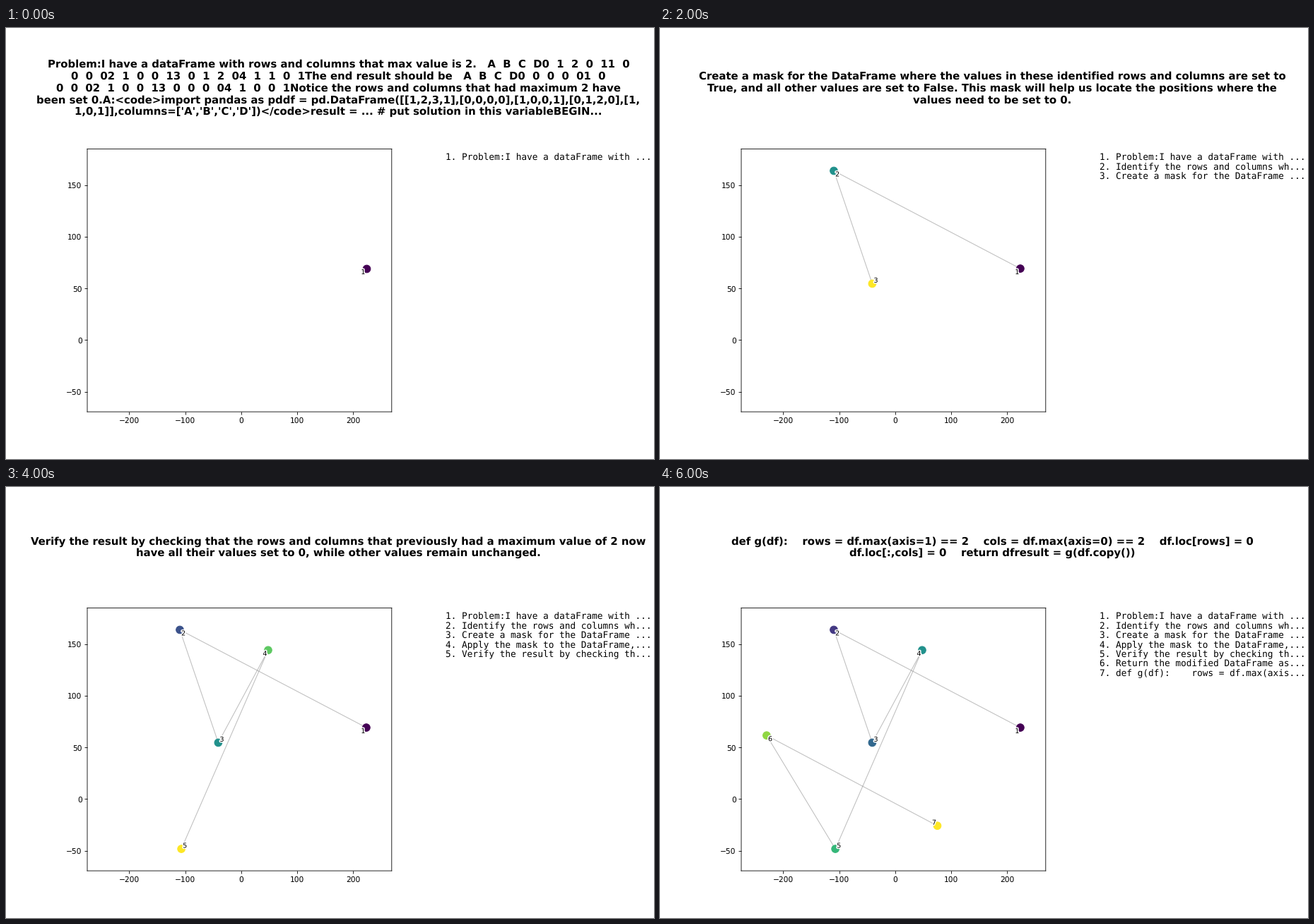
A matplotlib script for the animation above (7 s loop, 917 by 611 pixels).

```python
import matplotlib.pyplot as plt
import numpy as np
from matplotlib.animation import FuncAnimation
from matplotlib.patheffects import withStroke

W, H, DPI = 917, 611, 76.4
PX = 72 / DPI  # points per pixel
LEFT, RIGHT, TOP, BOTTOM = 115, 545.8, 171.4, 544.1  # plot box in pixels

# soft edges: neither text nor lines are forced onto the pixel grid
plt.rcParams.update({"font.family": "DejaVu Sans", "text.hinting": "none",
                     "path.snap": False})

STEPS = [
    ["Problem:I have a dataFrame with rows and columns that max value is 2."
     "   A  B  C  D0  1  2  0  11  0",
     "0  0  02  1  0  0  13  0  1  2  04  1  1  0  1The end result should be"
     "   A  B  C  D0  0  0  0  01  0",
     "0  0  02  1  0  0  13  0  0  0  04  1  0  0  1Notice the rows and columns"
     " that had maximum 2 have",
     "been set 0.A:<code>import pandas as pddf = "
     "pd.DataFrame([[1,2,3,1],[0,0,0,0],[1,0,0,1],[0,1,2,0],[1,",
     "1,0,1]],columns=['A','B','C','D'])</code>result = ... "
     "# put solution in this variableBEGIN..."],
    ["Identify the rows and columns where the maximum value is 2. "
     "This involves checking each row and",
     "column to see if the maximum value in that row or column is 2."],
    ["Create a mask for the DataFrame where the values in these identified "
     "rows and columns are set to",
     "True, and all other values are set to False. "
     "This mask will help us locate the positions where the",
     "values need to be set to 0."],
    ["Apply the mask to the DataFrame, setting all values in the identified "
     "rows and columns to 0. This",
     "will ensure that any cell in a row or column that had a maximum value "
     "of 2 is now 0."],
    ["Verify the result by checking that the rows and columns that previously "
     "had a maximum value of 2 now",
     "have all their values set to 0, while other values remain unchanged."],
    ["Return the modified DataFrame as the result."],
    ["def g(df):    rows = df.max(axis=1) == 2    cols = df.max(axis=0) == 2"
     "    df.loc[rows] = 0",
     "df.loc[:,cols] = 0    return dfresult = g(df.copy())"],
]

POINTS = np.array([(223.6, 69.3), (-109.7, 164), (-41, 54.7), (48.1, 144.3),
                   (-107, -48.2), (-229.8, 61.7), (75.3, -25.8)])
# side of the point on which each label sits (right, up)
SIDES = [(-1, -1), (1, -1), (1, 1), (-1, -1), (1, 1), (1, -1), (-1, 1)]

fig = plt.figure(figsize=((W + 0.001) / DPI, (H + 0.001) / DPI), dpi=DPI,
                 facecolor="white")
ax = fig.add_axes([LEFT / W, 1 - BOTTOM / H,
                   (RIGHT - LEFT) / W, (BOTTOM - TOP) / H])
low, high = POINTS.min(axis=0), POINTS.max(axis=0)
pad = 0.1 * (high - low)
ax.set_xlim(low[0] - pad[0], high[0] + pad[0])
ax.set_ylim(low[1] - pad[1], high[1] + pad[1])
ax.set_autoscale_on(False)

artists = []


def write(x, y, text, **style):
    """Put one line of text with its baseline at pixel y from the top."""
    artists.append(fig.text(x / W, 1 - y / H, text, va="baseline", **style))


def clear():
    while artists:
        artists.pop().remove()
    return []


def draw(frame):
    clear()
    count = frame + 1
    x, y = POINTS[:count].T

    lines = STEPS[frame]
    for i, line in enumerate(lines):
        write(470.4, 89.7 + 16.8 * (i - (len(lines) - 1) / 2), line,
              ha="center", size=14, weight="bold")

    for i in range(count):
        write(621.6, 188 + 13.3 * i, f"{i + 1}. {STEPS[i][0][:32]}...",
              size=12, family="DejaVu Sans Mono")

    for i in range(frame):
        artists.extend(ax.plot(x[i:i + 2], y[i:i + 2], color="gray", lw=1,
                               alpha=0.5, zorder=1))
    artists.append(ax.scatter(x, y, c=np.arange(count), cmap="viridis", s=100,
                              zorder=2))

    for i, (right, up) in enumerate(SIDES[:count]):
        artists.append(ax.annotate(
            str(i + 1), POINTS[i],
            ((4.8 * right + 0.3) * PX, (4.8 * up - 3.2) * PX),
            textcoords="offset points", ha="center", va="baseline", size=9,
            path_effects=[withStroke(linewidth=3, foreground="white")],
            zorder=3))
    return artists


anim = FuncAnimation(fig, draw, frames=len(STEPS), init_func=clear,
                     interval=1000, repeat=True, repeat_delay=0, blit=False)
plt.show()
```
